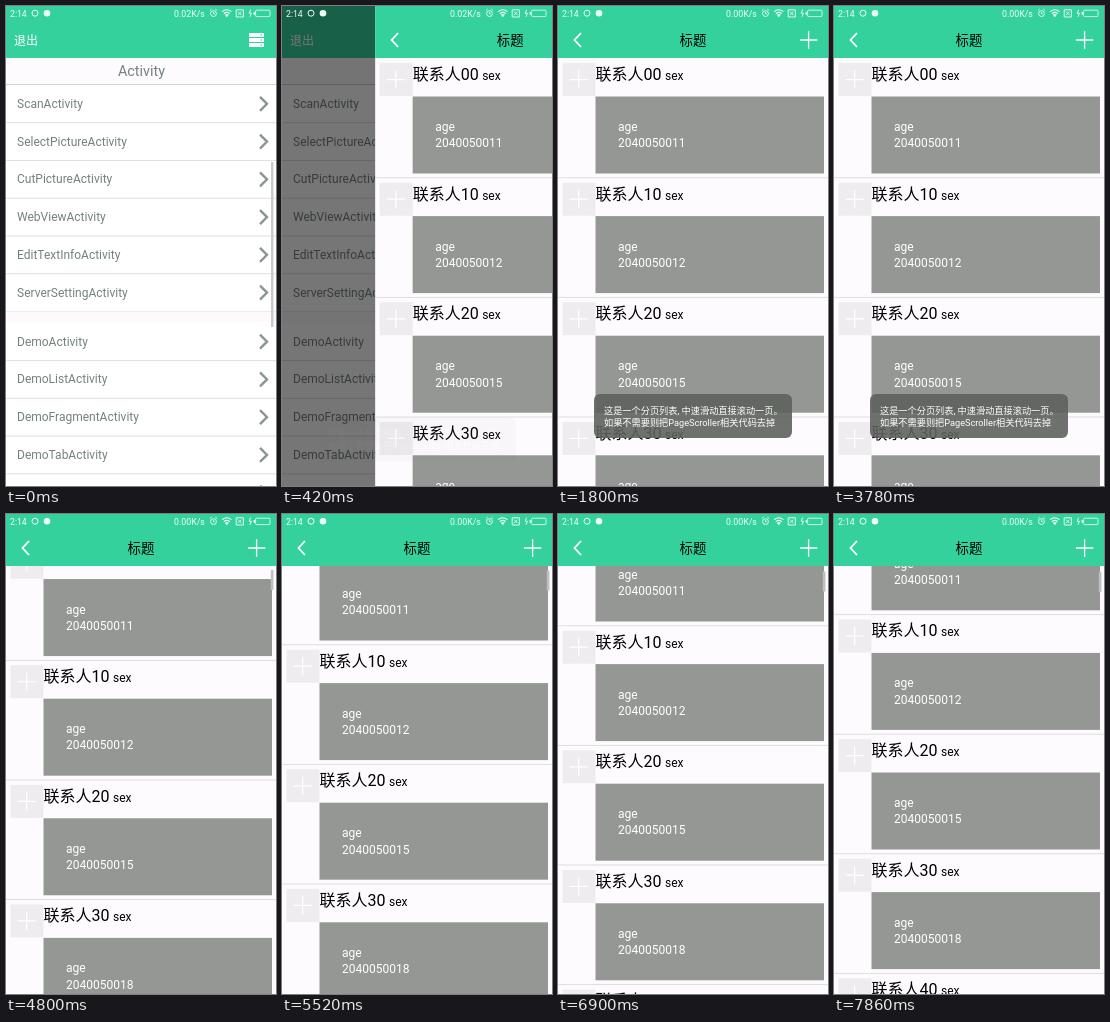
Animation of 270 by 480 pixels, one loop 8 s. Source, as an HTML page:

```html
<!DOCTYPE html>
<html lang="zh-CN">
<head>
<meta charset="utf-8">
<style>
html, body { margin: 0; width: 100%; height: 100%; overflow: hidden; background: #fefafe; }
svg { display: block; width: 100vw; height: 100vh; font-family: Roboto, "Noto Sans CJK SC", "Noto Sans CJK", sans-serif; }
</style>
</head>
<body>
<svg id="stage" viewBox="0 0 270 480"></svg>
<script>
const LOOP = 8000;
const GREEN = '#34d19c', PAPER = '#fefbfe';
const ROW = 119.6;
const PHONES = ['2040050011', '2040050012', '2040050015', '2040050018', '2040050021'];
const stage = document.getElementById('stage');

const rect = (x, y, w, h, fill, more = '') =>
  `<rect x="${x}" y="${y}" width="${w}" height="${h}" fill="${fill}" ${more}/>`;
const text = (x, y, size, fill, str, more = '') =>
  `<text x="${x}" y="${y}" font-size="${size}" fill="${fill}" ${more}>${str}</text>`;
const line = (d, color, width, more = '') =>
  `<path d="${d}" fill="none" stroke="${color}" stroke-width="${width}" ${more}/>`;
const plus = (x, y, r, width) =>
  line(`M${x - r} ${y}h${2 * r}M${x} ${y - r}v${2 * r}`, '#fff', width);
const middle = 'text-anchor="middle"';

function menuRow(name, y) {
  return text(11, y + 4, 12, '#74837c', name) +
    line(`M254 ${y - 7}l7 7l-7 7`, '#8b9691', 2.4) +
    rect(0, y + 18.4, 270, 1, '#dde0de');
}

function menuPage() {
  const first = ['Scan', 'SelectPicture', 'CutPicture', 'WebView', 'EditTextInfo', 'ServerSetting'];
  const demos = ['Demo', 'DemoList', 'DemoFragment', 'DemoTab', 'DemoPager'];
  const rows = (names, y) => names.map((n, i) => menuRow(n + 'Activity', y + i * 37.75)).join('');
  const bars = [27, 32, 37].map(y =>
    rect(243, y, 15, 4, '#fff') + rect(254.5, y + 1.4, 1.4, 1.2, GREEN)).join('');
  return rect(0, 0, 270, 480, '#fff') +
    rect(0, 0, 270, 52, GREEN) +
    text(8, 38.5, 12, '#fff', '退出') + bars +
    rect(0, 52, 270, 26, '#fefbfe') +
    text(135.5, 70, 14.4, '#74837c', 'Activity', middle) +
    rect(0, 78, 270, 1, '#cfd3d1') +
    rows(first, 97.8) +
    rect(0, 305.5, 270, 11.5, '#fdf9fd') +
    rows(demos, 335.7) +
    rect(265, 156, 2.5, 165, '#c9cbca');
}

function contact(i) {
  const y = 52.3 + i * ROW;
  return rect(4.5, y + 4.8, 33, 33, '#eeecee') +
    plus(20.7, y + 21.3, 9, 1.2) +
    text(37.5, y + 21.8, 16, '#000', `联系人${i}0`) +
    text(107, y + 21.8, 12, '#000', 'sex') +
    rect(37.5, y + 38.2, 228.5, 77, '#949793') +
    text(60, y + 72.8, 12, '#fff', 'age') +
    text(60, y + 89, 12, '#fff', PHONES[i]) +
    rect(0, y + ROW - 0.6, 270, 1, '#dfdddf');
}

function listPage() {
  return rect(0, 0, 270, 480, PAPER) +
    `<g id="list">${PHONES.map((_, i) => contact(i)).join('')}</g>` +
    rect(264.8, 55, 2.7, 20, '#bfc1c0', 'id="thumb"') +
    rect(0, 0, 270, 52, GREEN) +
    line('M23 27l-6.5 7l6.5 7', '#fff', 1.8) +
    text(135, 38.8, 13.4, '#000', '标题', middle) +
    plus(250.6, 34, 8.7, 1.3);
}

function statusBar() {
  const w = '#effff8';
  return text(4, 10.6, 8.7, w, '2:14') +
    `<circle cx="29" cy="7.2" r="3" fill="none" stroke="${w}"/>` +
    `<circle cx="41" cy="7.2" r="3.3" fill="${w}"/>` +
    text(168, 10.8, 8.8, w, '', 'id="speed"') +
    `<circle cx="207.5" cy="7.6" r="2.9" fill="none" stroke="${w}" stroke-width=".9"/>` +
    line('M207.5 6v1.8h1.4M203.9 4.6l1.8-1.6M211.1 4.6l-1.8-1.6', w, 0.8) +
    line('M216.2 5.6q4.6-3.8 9.2 0M217.8 7.6q3-2.4 6 0', w, 1.1) +
    `<path d="M218.8 8.8q2-1.6 4 0l-2 2.4z" fill="${w}"/>` +
    line('M230.2 3.8h7.2v7.2h-7.2zM232 5.6l3.6 3.6M235.6 5.6l-3.6 3.6', w, 0.9) +
    line('M244.6 3.6l-1.4 3.6h2.2l-1.4 3.6', w, 0.9) +
    rect(249.6, 4.2, 14.4, 6.4, 'none', `rx="1" stroke="${w}" stroke-width=".8"`) +
    rect(247.6, 6, 1.6, 2.8, w);
}

function toast() {
  return rect(36, 388, 198, 44, '#5f625e', 'rx="6" fill-opacity=".9"') +
    text(46, 407.6, 9.2, '#fff', '这是一个分页列表, 中速滑动直接滚动一页。') +
    text(46, 419.6, 9.2, '#fff', '如果不需要则把PageScroller相关代码去掉');
}

stage.innerHTML = menuPage() +
  rect(0, 0, 270, 480, '#000', 'id="dim"') +
  `<g id="page">${listPage()}</g>` +
  statusBar() +
  `<g id="toast">${toast()}</g>`;

const $ = id => document.getElementById(id);
const [dim, page, list, thumb, speed, note] =
  ['dim', 'page', 'list', 'thumb', 'speed', 'toast'].map($);

const part = (t, from, to) => Math.min(1, Math.max(0, (t - from) / (to - from)));

// Finger drags: time and scroll distance.
const DRAG = [[4260, 0], [4500, 8], [4800, 25.4], [5100, 34], [5520, 41], [5880, 41],
  [6300, 46.2], [6720, 57], [7260, 66], [7560, 66], [7860, 71.2]];

function scrollAt(t) {
  let y = 0;
  for (let i = 1; i < DRAG.length; i++) {
    const [t0, y0] = DRAG[i - 1], [t1, y1] = DRAG[i];
    y += (y1 - y0) * part(t, t0, t1);
  }
  return y;
}

function draw(t) {
  const shown = Math.sin(part(t, 60, 854) * Math.PI / 2);
  page.setAttribute('transform', `translate(${270 * (1 - shown)} 0)`);
  dim.setAttribute('opacity', 0.82 * shown);

  const y = scrollAt(t);
  list.setAttribute('transform', `translate(0 ${-y})`);
  thumb.setAttribute('y', 54.8 + y * 0.045);
  thumb.setAttribute('opacity', t >= 4320 ? 1 : 0);

  const alpha = part(t, 410, 780) * (1 - part(t, 3780, 4020));
  note.setAttribute('opacity', alpha);
  note.setAttribute('transform', `translate(0 ${24 * (1 - alpha)})`);

  speed.textContent = t < 1080 ? '0.02K/s' : '0.00K/s';
}

function tick() {
  draw(performance.now() % LOOP);
  requestAnimationFrame(tick);
}
tick();
</script>
</body>
</html>
```
